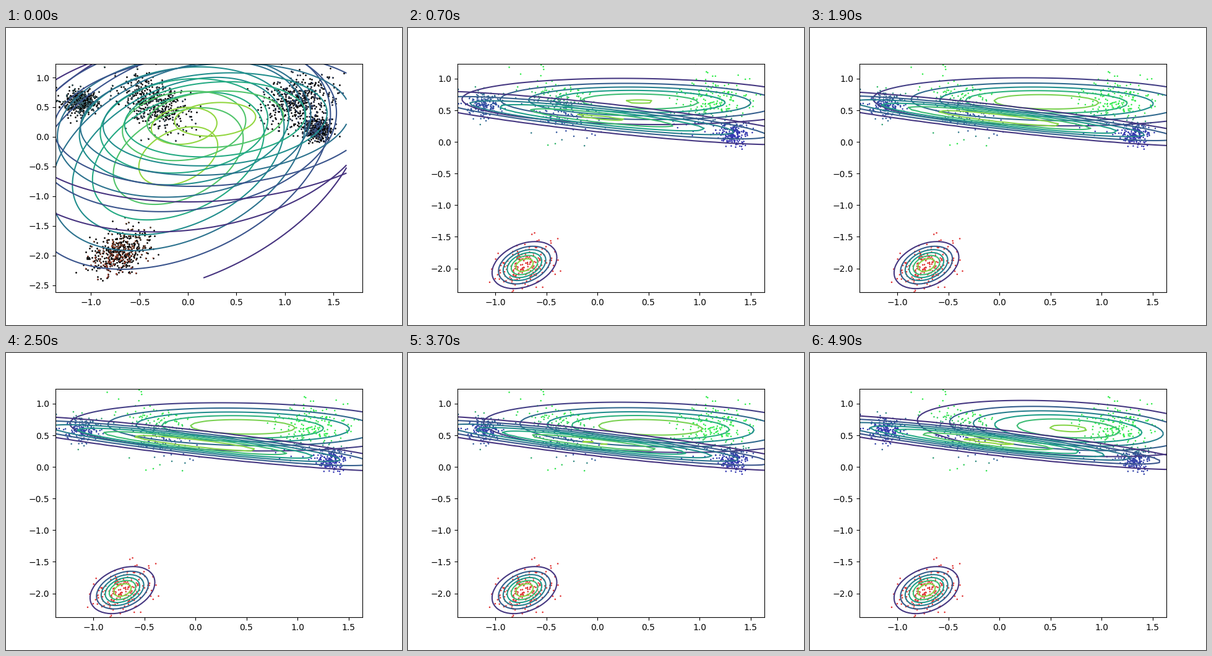
A matplotlib script for the animation above (5 s loop, 640 px wide and 480 px high).

```python
import numpy as np
import matplotlib.pyplot as plt
from matplotlib.animation import FuncAnimation
from matplotlib.colors import ListedColormap

FRAMES, INTERVAL = 50, 100

# Key poses: mean x, mean y, sigma x, regression slope, residual sigma y
STEPS = (0, 3, 11, 19, 49)
EASINGS = (
    lambda u: u,
    lambda u: 1 - (1 - u)**3,
    lambda u: u,
    lambda u: u**2.5,
)
RED = [(-0.10, -0.325, 0.958, 0.443, 1.084),
       (-0.714, -1.947, 0.161, 0.387, 0.178)]
GREEN = [(-0.04, 0.185, 0.97, 0.14, 0.882),
         (0.305, 0.57, 1.006, -0.02, 0.244),
         (0.43, 0.65, 0.904, -0.022, 0.183),
         (0.461, 0.634, 0.903, -0.029, 0.2),
         (0.675, 0.608, 0.775, -0.089, 0.222)]
BLUE = [(0.28, 0.295, 1.018, 0.095, 0.684),
        (0.145, 0.45, 1.063, -0.14, 0.18),
        (0.03, 0.373, 1.08, -0.18, 0.111),
        (0.0, 0.376, 1.095, -0.182, 0.104),
        (-0.12, 0.405, 1.06, -0.188, 0.104)]
COMPONENTS = (RED, GREEN, BLUE)
WEIGHTS = np.array([0.2, 0.3, 0.5])
COLORS = np.array([[0.88, 0.2, 0.2], [0.2, 0.93, 0.3], [0.2, 0.2, 0.7]])

# Mean x, mean y, sigma x, sigma y, correlation
CLUSTERS = [
    (-1.11, 0.59, 0.085, 0.10, 0.0),
    (-0.35, 0.57, 0.18, 0.23, -0.4),
    (1.14, 0.62, 0.18, 0.20, 0.2),
    (1.33, 0.12, 0.075, 0.10, 0.0),
    (-0.715, -1.95, 0.162, 0.188, 0.33),
]
X_RANGE, Y_RANGE = (-1.37, 1.636), (-2.378, 1.238)
GRID = np.meshgrid(np.linspace(*X_RANGE, 100), np.linspace(*Y_RANGE, 100))
LINES = ListedColormap(plt.get_cmap("viridis")(np.linspace(0.03, 0.95, 256)))
rng = np.random.default_rng(4)


def sample(n):
    parts = []
    for mx, my, sx, sy, rho in CLUSTERS:
        u, v = rng.standard_normal((2, n))
        parts.append(np.column_stack(
            [mx + sx * u, my + sy * (rho * u + np.sqrt(1 - rho**2) * v)]))
    return np.vstack(parts)


points = sample(200)
all_points = np.vstack([points, sample(270)])


def pose(keys, step):
    i = min(np.searchsorted(STEPS, step, side="right"), len(STEPS) - 1) - 1
    u = EASINGS[i]((step - STEPS[i]) / (STEPS[i + 1] - STEPS[i]))
    start, end = (np.array(keys[min(k, len(keys) - 1)]) for k in (i, i + 1))
    return start + (end - start) * u


def density(keys, step, x, y):
    mx, my, sx, slope, sy = pose(keys, step)
    dx = x - mx
    dy = y - my - slope * dx
    return (np.exp(-0.5 * ((dx / sx)**2 + (dy / sy)**2))
            / (2 * np.pi * sx * sy))


def point_colors(step):
    resp = np.column_stack([density(keys, step, *points.T)
                            for keys in COMPONENTS]) * WEIGHTS
    resp /= resp.sum(axis=1, keepdims=True) + 1e-300
    return np.clip(resp @ COLORS, 0, 1)


fig, ax = plt.subplots(figsize=(6.4, 4.8), dpi=100)


def draw(step):
    ax.clear()
    first = step == 0
    if first:
        ax.scatter(*all_points.T, s=4, c="black", linewidths=0)
    ax.scatter(*points.T, s=2 if first else 3.4, c=point_colors(step),
               linewidths=0)
    for keys in COMPONENTS:
        ax.contour(*GRID, density(keys, step, *GRID), cmap=LINES)
    ax.set_xlim(*((-1.367, 1.80) if first else X_RANGE))
    ax.set_ylim(*((-2.622, 1.234) if first else Y_RANGE))


anim = FuncAnimation(fig, draw, frames=FRAMES, interval=INTERVAL,
                     init_func=lambda: None, repeat=True, repeat_delay=0)
plt.show()
```
